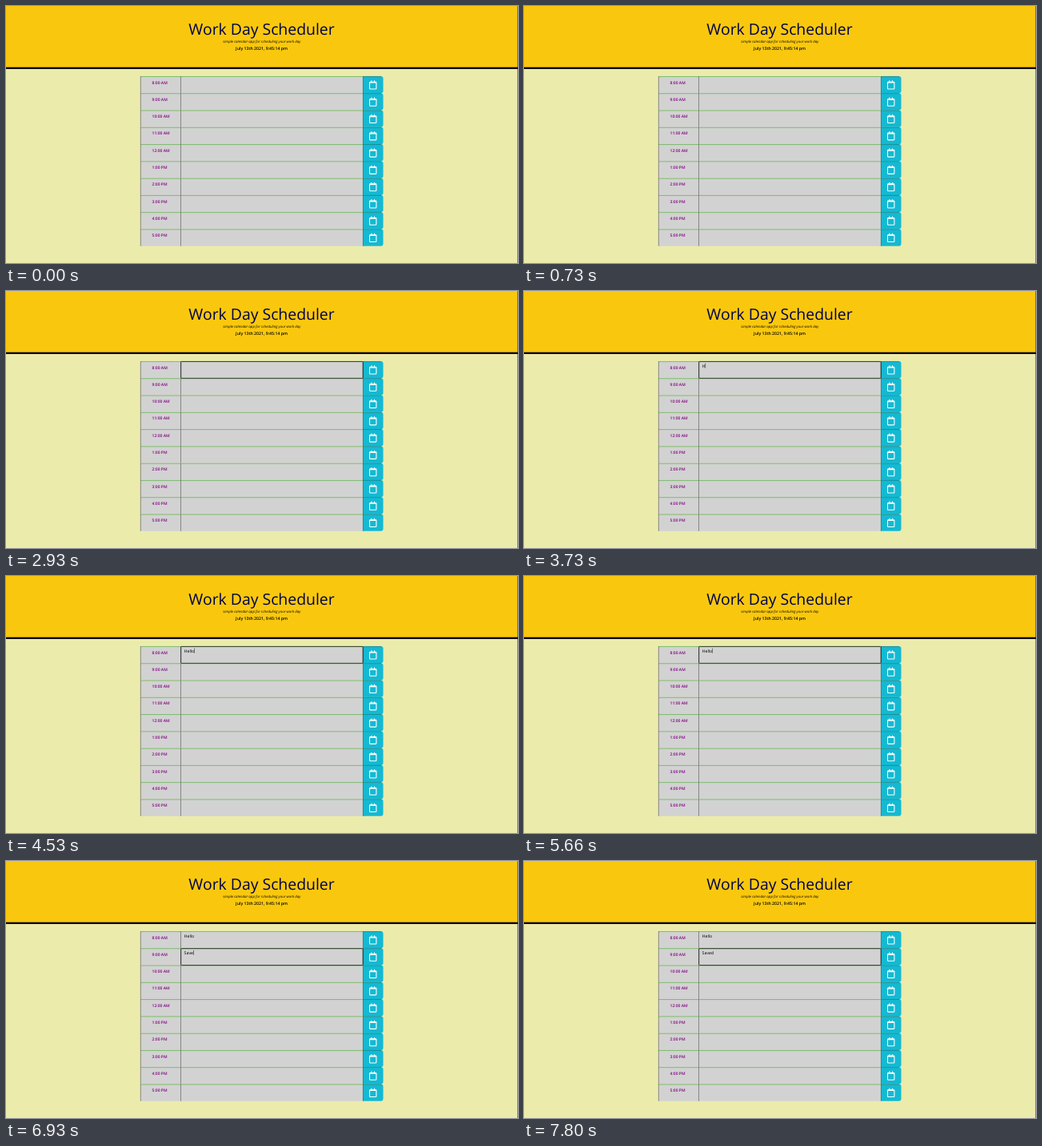
Write an HTML page that moves like this. It is 640 by 322 pixels and loops after 8000 ms.

```html
<!DOCTYPE html>
<html lang="en">
<head>
<meta charset="utf-8">
<title>Work Day Scheduler</title>
<style>
  html, body { margin: 0; height: 100%; overflow: hidden; background: #ebebac; }
  svg { display: block; width: 640px; height: 322px; }
  text { font-family: "Open Sans", sans-serif; text-rendering: geometricPrecision; }
  .title { font-size: 19.4px; fill: #00004d; text-anchor: middle; }
  .sub { font-size: 4.41px; font-style: italic; text-anchor: middle; }
  .date { font-size: 5.2px; font-weight: 600; text-anchor: middle; }
  .hour { font-size: 5px; font-weight: 600; fill: #800080; }
  .note { font-size: 5.25px; fill: #000; }
</style>
</head>
<body>
<svg viewBox="0 0 640 322">
  <defs>
    <g id="save">
      <path d="M446 0h22.5q3 0 3 3v15.3q0 3-3 3H446z" fill="#14b9d2"/>
      <path d="M446.4 0v21.3M446 .4h23" stroke="#1b7f86" stroke-width=".7"/>
      <rect x="454.5" y="7.2" width="8.4" height="8.8" rx=".8" fill="none" stroke="#fff" stroke-width="1.1"/>
      <path d="M454.5 8h8.4M456.9 5.3v2.5M460.5 5.3v2.5" stroke="#fff" stroke-width="1.2"/>
    </g>
  </defs>
  <rect width="640" height="77" fill="#f9c80e"/>
  <rect y="76.7" width="640" height="2.3"/>
  <text class="title" x="319.5" y="35.9">Work Day Scheduler</text>
  <text class="sub" x="319.8" y="46">simple calendar app for scheduling your work day</text>
  <text class="date" x="319.5" y="54.6">July 13th 2021, 9:45:14 pm</text>
  <g id="rows"></g>
  <rect id="ring" x="218.7" width="227.5" height="20.9" rx=".8" fill="none" stroke="#222" stroke-width=".85"/>
  <text class="note" id="note0" x="222.6" y="95.6"></text>
  <text class="note" id="note1" x="222.6" y="116.9"></text>
  <rect id="caret" width=".5" height="6" fill="#111"/>
  <rect x="639.5" width=".5" height="322" fill="#222"/>
</svg>
<script>
const LOOP = 8000, BLINK = 533, ROW = 21.28;
const $ = id => document.getElementById(id);
const rowTop = i => 88 + ROW * i;

const hours = ["8:00 AM", "9:00 AM", "10:00 AM", "11:00 AM", "12:00 AM",
  "1:00 PM", "2:00 PM", "3:00 PM", "4:00 PM", "5:00 PM"];

$("rows").innerHTML = hours.map((hour, i) => {
  const y = rowTop(i);
  return `<rect x="168" y="${y}" width="278" height="${ROW}" fill="#d2d2d2"/>
    <path d="M168 ${y + .45}H446" stroke="#72b865" stroke-width=".9"/>
    <path d="M168.3 ${y}v${ROW}M218.5 ${y}v${ROW}" stroke="#666" stroke-width=".7"/>
    <use href="#save" y="${y}"/>
    <text class="hour" x="182.6" y="${y + 9.6}">${hour}</text>`;
}).join("");

// Each entry: time the field gains focus, its text, and the key times
const entries = [
  { focus: 1330, text: "Hello", keys: [3730, 4060, 4200, 4400, 4530] },
  { focus: 5930, text: "Saved", keys: [6330, 6530, 6730, 6930, 7130] }
];

function draw(t) {
  const active = t >= entries[1].focus ? 1 : t >= entries[0].focus ? 0 : -1;
  entries.forEach(({ text, keys }, i) => {
    $("note" + i).textContent = text.slice(0, keys.filter(k => k <= t).length);
  });
  $("ring").style.display = $("caret").style.display = active < 0 ? "none" : "";
  if (active < 0) return;

  const { focus, keys } = entries[active];
  const lastInput = Math.max(focus, ...keys.filter(k => k <= t));
  const lit = Math.floor((t - lastInput + 5) / BLINK) % 2 === 0;
  const note = $("note" + active);
  const y = rowTop(active);
  $("ring").setAttribute("y", y + .4);
  $("caret").setAttribute("x", 222.7 + (note.textContent ? note.getComputedTextLength() : 0));
  $("caret").setAttribute("y", y + 2.6);
  $("caret").style.display = lit ? "" : "none";
}

function tick() {
  draw(performance.now() % LOOP);
  requestAnimationFrame(tick);
}
tick();
</script>
</body>
</html>
```
